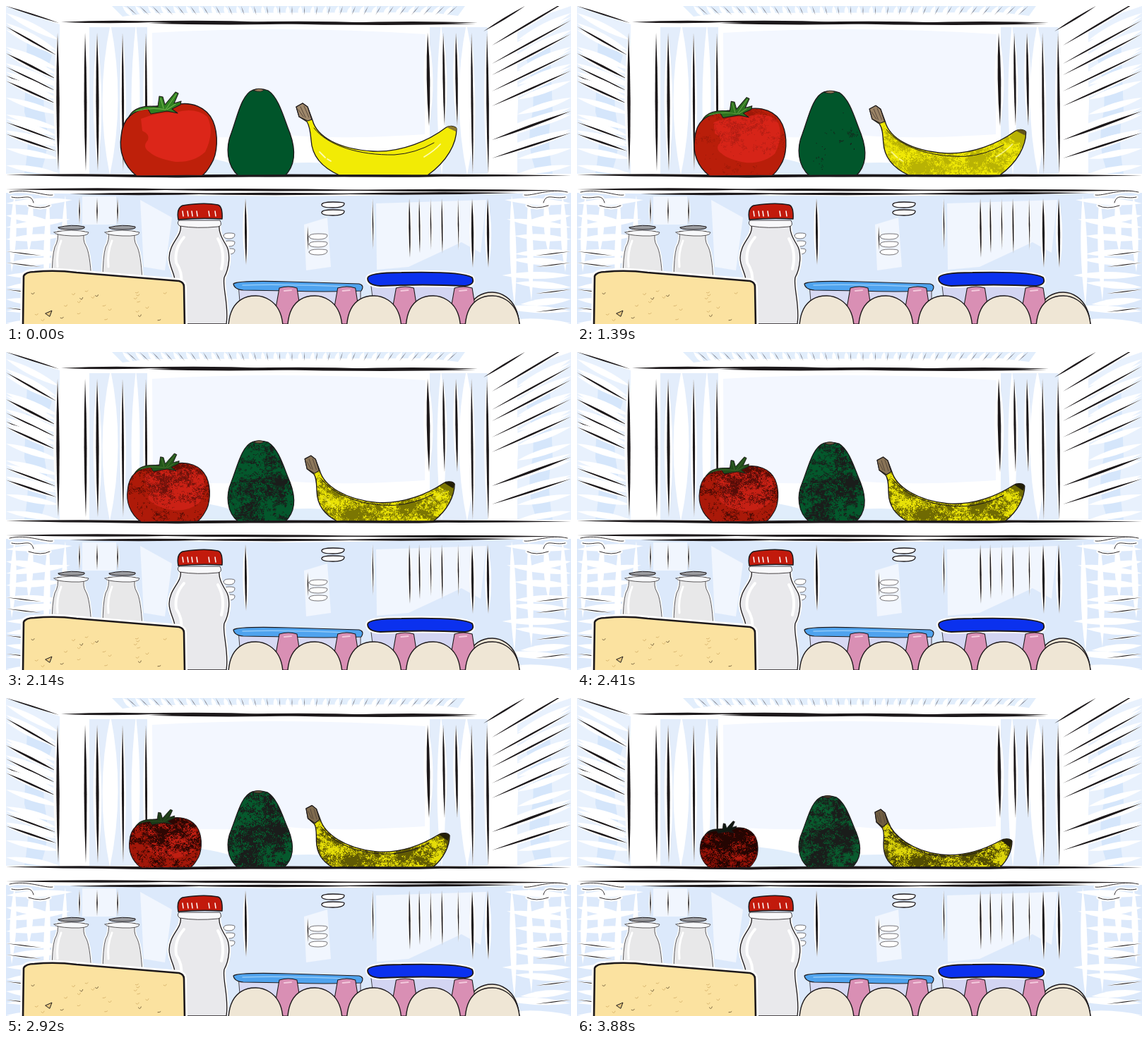
An HTML page with a canvas that plays this animation: 800x451 px, repeating every 4680 ms.

```html
<!DOCTYPE html>
<html>
<head>
<meta charset="utf-8">
<title>Fridge</title>
<style>
html, body { margin: 0; width: 100%; height: 100%; overflow: hidden; background: #fff }
canvas { position: absolute; left: 0; top: 0 }
</style>
</head>
<body>
<canvas id="room" width="800" height="451"></canvas>
<canvas id="food" width="800" height="451"></canvas>
<script>
const INK = '#1d191b', WHITE = '#fff', LOOP = 4680, START = 1000, END = 3880, STEP = 30, SHELF = 241;
let c = room.getContext('2d');

const mix = (a, b, k) => a + (b - a) * k;
const tint = (a, b, k) => `rgb(${a.map((v, i) => mix(v, b[i], k))})`;
const hash = (i, j = 0) => {
  const s = Math.sin(i * 127.1 + j * 311.7) * 43758.5453;
  return s - Math.floor(s);
};
function noise(x, y) {
  const i = Math.floor(x), j = Math.floor(y), smooth = f => f * f * (3 - 2 * f);
  const u = smooth(x - i), v = smooth(y - j);
  return mix(mix(hash(i, j), hash(i + 1, j), u), mix(hash(i, j + 1), hash(i + 1, j + 1), u), v);
}
// Blends two paths that have the same commands
function morph([a, b], k) {
  const to = b.match(/[\d.]+/g);
  let i = 0;
  return a.replace(/[\d.]+/g, n => mix(+n, +to[i++], k));
}

function fill(color, path) {
  c.fillStyle = color;
  c.fill(new Path2D(path));
}
function line(path, width = 1.5, color = INK) {
  c.strokeStyle = color;
  c.lineWidth = width;
  c.lineCap = c.lineJoin = 'round';
  c.stroke(new Path2D(path));
}
function shape(color, path, width, edge) {
  fill(color, path);
  line(path, width, edge);
}
// A stroke that is thin at both ends
function brush(x, y, u, v, w, color = INK) {
  const d = Math.hypot(u - x, v - y), mx = (x + u) / 2, my = (y + v) / 2;
  const ox = (y - v) / d * w, oy = (u - x) / d * w;
  fill(color, `M${x} ${y}Q${mx + ox} ${my + oy} ${u} ${v}Q${mx - ox} ${my - oy} ${x} ${y}Z`);
}
function inkBrush(x, y, u, v, w) {
  brush(x, y, u, v, w * 2.8, WHITE);
  brush(x, y, u, v, w);
}
// Ribs of a side wall, flatter towards the shelf
function ribs(from, to, ys) {
  for (const y of ys) {
    const rise = Math.abs(to - from) * (.69 - .0017 * y);
    brush(from, y - 7, to, y - rise - 5, 9, WHITE);
    inkBrush(from, y, to, y - rise, 2 + 1.6 * hash(y));
  }
}
// A long edge built from overlapping strokes
function edge(x, u, y, n = 4) {
  const step = (u - x) / n;
  for (let i = 0; i < n; i++)
    brush(x + step * (i - .3 * (i > 0)), y + hash(i, y) * 2 - 1, x + step * (i + 1), y + hash(i + 1, y) * 2 - 1, 3.5);
}
function bothSides(draw) {
  for (const side of [1, -1]) {
    c.save();
    if (side < 0) c.transform(-1, 0, 0, 1, 800, 0);
    draw();
    c.restore();
  }
}

function drawUpperRoom() {
  bothSides(() => {
    fill('#e8f1fd', 'M0 0L76 26V238H0Z');
    fill('#d5e6fb', 'M30 45L65 70Q48 120 56 160T48 238H26Q36 180 26 150Z');
    fill('#e3edfb', 'M118 30H200V238H118Z');
    brush(92, 25, 92, 240, 34, WHITE);
    brush(148, 25, 147, 240, 22, WHITE);
    brush(184, 25, 183, 240, 12, WHITE);
    for (let y = 10; y < 240; y += 24) brush(0, y, 76, y + 40 - y / 8, 9, WHITE);
  });
  fill('#f3f7ff', 'M207 38Q400 27 594 40L593 182Q470 190 400 183 300 190 208 182Z');
  fill('#e0edfb', 'M202 207Q290 212 320 224L430 222Q520 226 598 217V239H202Z');

  fill('#e2eefc', 'M150 0H650L640 14 600 9 200 10 165 15Z');
  for (let x = 165; x < 645; x += 18) {
    const lean = (400 - x) / 16;
    brush(x, 0, x + lean, 15, 6, WHITE);
    brush(x + 6, 0, x + 6 + lean, 13, .9, '#77747c');
  }
  ribs(72, 0, []);
  c.save();
  c.transform(-1, 0, 0, 1, 72, 0);
  ribs(0, 72, [70, 104, 121, 132, 139, 191, 206]);
  c.restore();
  ribs(688, 800, [56, 82, 98, 121, 142, 190, 216]);
  brush(0, 0, 75, 24, 2);
  brush(676, 36, 735, 0, 2.5);
  for (const x of [73, 112, 129, 165, 198]) inkBrush(x, 38, x + 1, 234, 3 + 2.5 * hash(x));
  for (const x of [597, 619, 637, 659, 681]) inkBrush(x, 38, x + 2, 170 + 68 * (x > 640), 3 + 2 * hash(x));
  edge(78, 668, 23);
  edge(200, 665, 25, 2);
}

function drawVents(x, y, rows, w, width) {
  for (let i = 0; i < rows; i++, y += 11)
    shape(WHITE, `M${x - w} ${y}Q${x - w} ${y - 4} ${x} ${y - 4}T${x + w} ${y - 2}Q${x + w} ${y + 4} ${x} ${y + 4}T${x - w} ${y}`, width);
}

function drawLowerRoom() {
  fill('#dce9fb', 'M0 250H800V451H0Z');
  fill('#f1f6fe', 'M108 270H156V310H108ZM190 275L235 300 225 375 195 370ZM422 310L455 300 460 370 425 375ZM524 280L680 275 672 350 645 335 570 370 525 374Z');
  fill(WHITE, 'M0 240H800V265L400 270 0 265Z');
  bothSides(() => {
    for (let y = 280; y < 451; y += 17) brush(0, y, 62 + 40 * hash(y), y + 12 - 24 * hash(y, 1), 10, WHITE);
    for (let x = 12; x < 100; x += 24) brush(x, 268, x - 4, 350 + 80 * hash(x), 9, WHITE);
    const bracket = 'M5 264C30 258 55 270 66 268M8 271C25 275 35 264 39 279M32 283Q50 289 62 283';
    line(bracket, 5, WHITE);
    line(bracket, .9);
    for (const y of [348, 364, 402, 428]) inkBrush(0, y, 50, y + 6, 1.3);
  });
  edge(0, 800, 240, 3);
  edge(120, 640, 241, 2);
  edge(0, 790, 261, 3);
  edge(90, 725, 266, 3);
  for (const x of [104, 129, 158]) inkBrush(x, 272, x, 309, 1.6);
  for (const x of [339, 519, 571, 585, 601, 617, 640, 660, 682]) {
    const h = hash(x);
    inkBrush(x, 273, x + 1, 345 + 32 * h, 1.5 + 2.2 * h);
  }
  inkBrush(427, 312, 428, 347, 1.5);
  drawVents(463, 282, 2, 16, 1.3);
  drawVents(442, 327, 3, 13, .6);
  drawVents(316, 326, 3, 8, .6);
}

function drawJar(x) {
  c.save();
  c.translate(x, 0);
  const body = 'M8 320Q10 332 4 342Q0 355 0 390H56Q54 350 48 340Q43 332 46 320Z';
  line(body, 4, WHITE);
  shape('#e8e8e9', body, .9, '#4a484c');
  shape('#f7f8fa', 'M3 321Q28 315 52 321Q52 327 28 326T3 321', .7);
  shape('#9b9ca0', 'M9 314Q28 309 46 313Q49 317 28 317T9 314', 1);
  line('M13 333Q6 350 8 370', 3, WHITE);
  c.restore();
}

function drawBottle() {
  const body = 'M247 311C250 326 231 336 231 357C231 373 243 382 238 401L237 451H312C316 425 306 398 309 385C316 372 319 350 311 338C305 328 301 320 302 311Z';
  line(body, 5, WHITE);
  shape('#e9e9ec', body, 1.3);
  shape('#f8f8fa', 'M245 304H303Q307 312 300 313Q270 316 246 312Q241 308 245 304Z', .8);
  line('M252 328Q238 344 241 364Q250 378 248 392M300 330Q311 350 305 373', 4, WHITE);
  shape('#c21a0c', 'M250 283Q280 278 300 282Q307 284 306 302Q275 300 244 303Q241 287 250 283Z', 1.5);
  for (const x of [250, 257, 263, 270, 287, 296]) line(`M${x} 291L${x + 1} 298`, 1.5, WHITE);
}

function drawCheese() {
  const block = 'M25 383Q28 377 40 377Q70 374 100 378L245 390Q252 392 252 398L253 453H24Z';
  line(block, 8, WHITE);
  shape('#fbe2a0', block, 2.6);
  for (let i = 0; i < 24; i++)
    line(`M${36 + 200 * hash(i)} ${396 + 50 * hash(i, 7)}q3 ${4 * hash(i, 3)} 4 -1`, .9, i % 4 ? '#d6b36b' : '#6d5936');
  shape('#e8c77e', 'M56 436L65 432 62 440Z', 1);
}

function drawBoxes() {
  shape('#d7d9f3', 'M330 402H502V451H334Z', .8);
  shape('#4fa3ee', 'M322 394Q328 389 400 391L500 394Q508 396 503 404Q450 406 400 404L336 403Q323 402 322 394Z', 1.2);
  line('M335 396Q390 394 480 398', 1.5, '#91caf9');
  shape('#d3d5f2', 'M517 394H656L650 451H524Z', .8);
  const lid = 'M512 386Q513 378 560 378Q645 376 660 385Q665 395 650 397Q590 394 530 397Q512 396 512 386Z';
  line(lid, 6, WHITE);
  shape('#0b31ee', lid, 1.8);
}

function drawEgg(x, top) {
  shape('#efe6d5', `M${x - 39} 453C${x - 36} ${top - 2} ${x - 4} ${top} ${x} ${top}S${x + 35} ${top + 2} ${x + 38} 453Z`, 1.4);
}
function drawEggs() {
  drawEgg(689, 406);
  for (let x = 400; x < 650; x += 82.7) {
    shape('#d98fb4', `M${x - 13} 400Q${x} 396 ${x + 12} 400L${x + 20} 451H${x - 22}Z`, 1.1);
    line(`M${x - 6} 404L${x + 4} 403`, 2, '#f4cadd');
  }
  for (let x = 354; x < 700; x += 83.8) drawEgg(x, 411);
}

// Grain: clumps of dark specks that spread as the level rises
function makeGrain(w, h, rgb, spots) {
  const canvas = document.createElement('canvas');
  canvas.width = w;
  canvas.height = h;
  const g = canvas.getContext('2d'), img = g.createImageData(w, h);
  const field = Array.from({ length: w * h }, (_, n) => {
    const x = n % w, y = n / w | 0;
    img.data.set(rgb, n * 4);
    const f = .3 * noise(x / 15 + w, y / 15) + .35 * noise(x / 4, y / 4 + w) + .35 * hash(x + w, y);
    return spots.reduce((v, [sx, sy, r]) => v - .2 * Math.exp(-((x - sx) ** 2 + (y - sy) ** 2) / r / r), f);
  });
  return level => {
    field.forEach((f, n) => img.data[n * 4 + 3] = f < level ? 255 : 0);
    g.putImageData(img, 0, 0);
    return canvas;
  };
}
function spoil(path, grain, alpha, x, y, w, h) {
  c.save();
  c.clip(new Path2D(path));
  c.globalAlpha = alpha;
  c.drawImage(grain, x, y, w, h);
  c.restore();
}
// Draws a fruit of a given size, squeezed between new edges above the shelf
function squeeze(x, y, w, left, right, top, draw) {
  c.save();
  c.translate(left, top);
  c.scale((right - left) / w, (SHELF - top) / (SHELF - y));
  c.translate(-x, -y);
  draw();
  c.restore();
}

const tomatoGrain = makeGrain(136, 102, [25, 4, 2], [[106, 30, 20], [45, 45, 30], [75, 10, 25]]);
const avocadoGrain = makeGrain(92, 123, [28, 27, 27], [[64, 62, 22], [30, 92, 18]]);
const bananaGrain = makeGrain(228, 104, [48, 43, 3], [[220, 42, 14], [220, 42, 14], [75, 88, 20], [165, 80, 22]]);

const TOMATO = 'M185 241C166 226 160 205 163 185C165 158 181 147 205 143C215 141 225 142 240 140C262 135 284 143 293 163C301 182 300 210 290 225Q284 236 277 241Z';
const BLUSH = 'M191 160Q215 150 240 151Q268 143 285 157Q296 178 282 207Q266 222 240 221Q212 216 203 207Q192 200 201 190Q204 182 193 177Z';
const LEAVES = 'M174 157C180 145 195 140 215 143L217 128 222 129 225 140 240 122 244 124 238 138 248 135 247 140 235 146 243 152 228 149 205 153 201 146Q185 147 174 157Z';
const AVOCADO = 'M330 241C313 226 312 200 320 180C328 158 334 125 350 119Q360 116 371 120C386 130 393 160 401 180C409 203 410 225 394 241Z';
const BANANA = [
  'M411 143L420 138 427 143 434 162C440 185 470 203 520 206C560 208 600 190 622 173C627 169 636 170 638 174C638 195 625 220 597 240L472 240C445 228 433 210 432 190C431 178 430 170 426 164L415 157Z',
  'M422 162L430 158 436 163 441 176C447 195 475 217 515 222C550 226 580 213 600 202C605 199 614 199 616 203C616 215 610 230 599 240L450 240C438 232 434 220 434 208C434 198 436 190 432 184L424 176Z'];
const STEM = ['M411 143L420 138 427 143 433 161 427 163 415 157Z', 'M422 162L430 158 436 163 440 177 433 183 424 176Z'];
const FIBRES = ['M417 143L424 158M422 142L429 158M414 147L421 157', 'M428 163L431 177M433 163L436 177M425 166L429 176'];
const TIP = ['M624 172Q630 168 638 173L637 178Z', 'M601 202Q608 197 616 203L613 212Z'];
const RIDGE = ['M436 173C455 198 500 212 550 211Q580 209 606 194', 'M442 187C460 210 490 226 535 225Q562 223 588 211'];

function drawTomato(age, swing) {
  squeeze(162, 139, 136, 162 + 12 * age + 5 * swing, 298 - 14 * age - 28 * age * age, 139 + 45 * age + swing, () => {
    fill(tint([190, 32, 10], [150, 18, 8], age), TOMATO);
    fill(tint([220, 38, 25], [176, 26, 14], age), BLUSH);
    spoil(TOMATO, tomatoGrain(.2 + .3 * age), Math.min(.92, age * 1.3), 162, 139, 136, 102);
    line(TOMATO, 1.4);
    shape(tint([48, 128, 32], [16, 24, 18], age), LEAVES, 1.1);
    line('M184 149Q205 143 226 147L241 125M219 131L223 145M240 139L228 147', 1.1, tint([112, 178, 75], [18, 26, 18], age));
  });
}

function drawAvocado(age, swing) {
  squeeze(315, 118, 92, 314, 408 - 7 * age + 3 * swing, 118 + 21 * age, () => {
    fill(tint([0, 85, 42], [9, 91, 46], age), AVOCADO);
    spoil(AVOCADO, avocadoGrain(.48 * (1 - Math.exp(6 * (.1 - age)))), .95, 315, 118, 92, 123);
    line(AVOCADO, 1.3);
    shape(tint([154, 125, 92], [72, 60, 42], age), 'M351 120Q357 115 365 119Q362 123 351 120Z', .8);
  });
}

function drawBanana(age, swing) {
  const k = age * (1.25 - .25 * age), bend = pair => morph(pair, k), skin = bend(BANANA);
  c.save();
  c.translate(8 * swing * swing, 0);
  fill(tint([242, 235, 5], [222, 214, 10], age), skin);
  const left = mix(411, 422, k), top = mix(137, 159, k);
  spoil(skin, bananaGrain(.45), .85 * (1 - Math.exp(-3 * age)), left, top, mix(639, 617, k) - left, SHELF - top);
  line(skin, 1.3);
  line(bend(RIDGE), 1);
  shape(tint([160, 137, 108], [112, 94, 65], age), bend(STEM), 1.1);
  line(bend(FIBRES), 1, '#58483b');
  fill(tint([139, 120, 45], [35, 31, 8], Math.min(1, age * 3)), bend(TIP));
  c.globalAlpha = Math.max(0, 1 - age * 2);
  line('M444 207L452 215M455 217L460 220M592 214Q607 205 615 196', 1.8, '#fffcb0');
  c.restore();
}

function drawFood(age) {
  const swing = Math.sin(Math.PI * age);
  c.clearRect(0, 0, 800, 451);
  for (const draw of [drawTomato, drawAvocado, drawBanana]) draw(age, swing);
  edge(175, 625, 241, 3);
}

drawUpperRoom();
drawLowerRoom();
drawJar(65);
drawJar(137);
for (const draw of [drawBottle, drawCheese, drawBoxes, drawEggs]) draw();
c = food.getContext('2d');

let shown;
function tick() {
  const t = Math.min(END, Math.max(START, performance.now() % LOOP));
  const step = Math.floor((t - START) / STEP);
  if (step != shown) drawFood((shown = step) * STEP / (END - START));
  requestAnimationFrame(tick);
}
tick();
</script>
</body>
</html>
```
